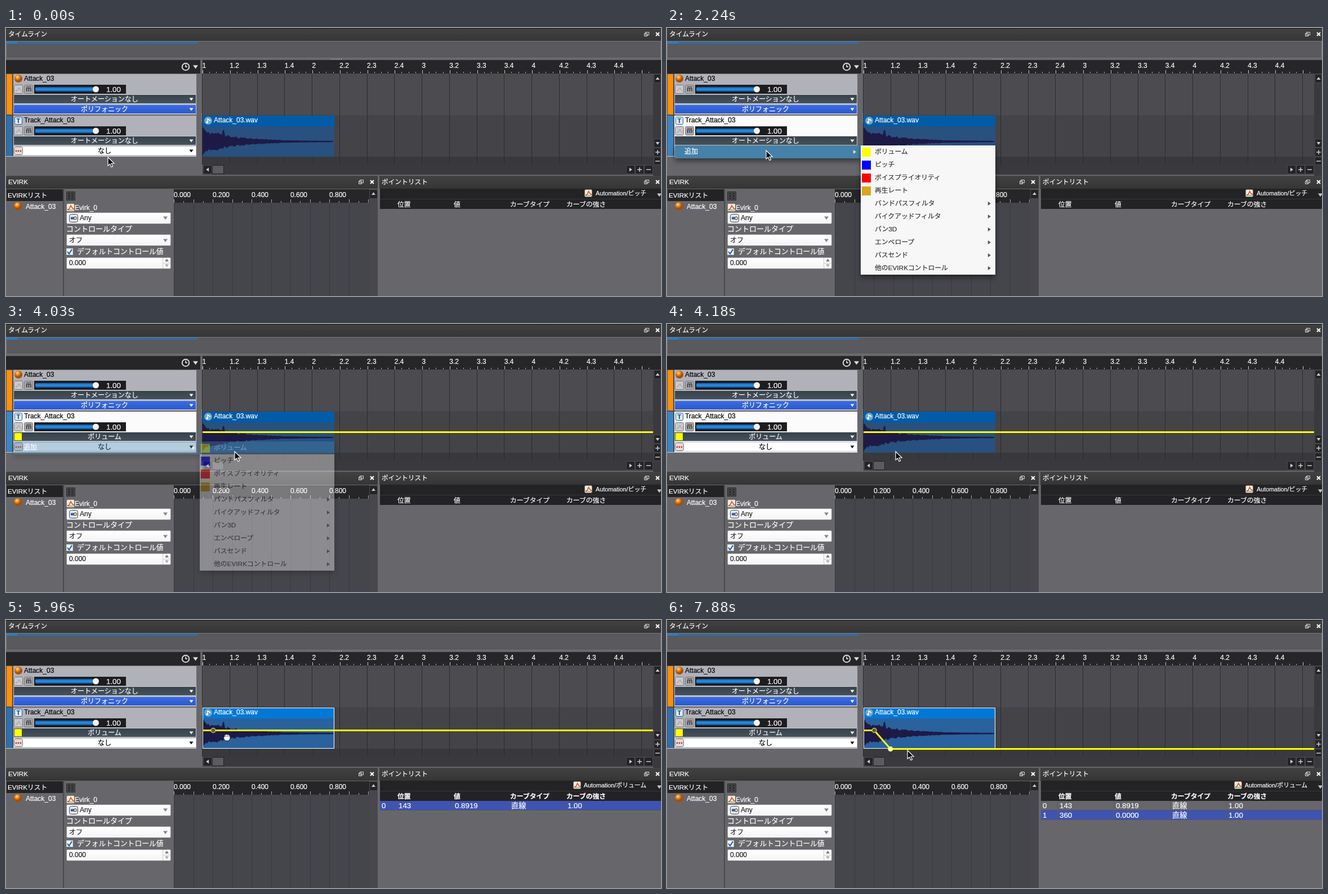
Animation of 1163x477 px, one loop 8000 ms. Source, as an HTML page:

```html
<!DOCTYPE html>
<html lang="ja">
<head>
<meta charset="utf-8">
<style>
html, body { margin: 0; width: 100%; height: 100%; overflow: hidden; background: #67676b; }
svg { display: block; width: 1163px; height: 477px; }
text { font-family: "Liberation Sans", "Noto Sans CJK JP", "Noto Sans CJK", sans-serif; white-space: pre; }
.menu { filter: drop-shadow(0 5px 5px #0007); }
</style>
</head>
<body>
<svg id="stage" viewBox="0 0 1163 477"></svg>
<script>
const LOOP = 8000, GREY = '#67676b', DARK = '#232326', YELLOW = '#ffff00';
const LEFT = 349, BEAT = 48.75;

const rect = (x, y, w, h, fill, extra = '') =>
  `<rect x="${x}" y="${y}" width="${w}" height="${h}" fill="${fill}" ${extra}/>`;
const frame = (x, y, w, h, fill, stroke, extra = '') =>
  rect(x + .5, y + .5, w - 1, h - 1, fill, `stroke="${stroke}" ${extra}`);
const path = (d, fill = 'none', stroke = 'none', width = 1) =>
  `<path d="${d}" fill="${fill}" stroke="${stroke}" stroke-width="${width}"/>`;
const circle = (x, y, r, fill, extra = '') => `<circle cx="${x}" cy="${y}" r="${r}" fill="${fill}" ${extra}/>`;
const text = (x, y, str, fill = '#fff', size = 12, extra = '') =>
  `<text x="${x}" y="${y}" fill="${fill}" stroke="${fill}" stroke-width=".2" font-size="${size}" ${extra}>${str}</text>`;
const centered = (x, y, str, fill) => text(x, y, str, fill, 12, 'text-anchor="middle"');
const repeat = (n, draw) => Array.from({ length: n }, (_, i) => draw(i)).join('');

const triangle = (x, y, dir, fill = '#fff', r = 3.5) => `<path d="M${-r} ${-r * .6}H${r}L0 ${r * .8}Z" fill="${fill}"
  transform="translate(${x} ${y}) rotate(${{ down: 0, left: 90, up: 180, right: -90 }[dir]})"/>`;
const gradient = (id, ...stops) => `<linearGradient id="${id}" x2="0" y2="1">${
  stops.map((c, i) => `<stop offset="${i / (stops.length - 1)}" stop-color="${c}"/>`).join('')}</linearGradient>`;

const defs = '<defs>' +
  gradient('title', '#424242', '#353535') + gradient('slate', '#35414b', '#46525c') +
  gradient('royal', '#3a6ee6', '#2b58cc') + gradient('slide', '#0d57a5', '#2a93e8', '#0d57a5') +
  gradient('plain', '#fff', '#f4f4f6') +
  `<radialGradient id="ball" cx=".38" cy=".3"><stop stop-color="#ffe2b0"/><stop offset=".4" stop-color="#f59426"/>
   <stop offset="1" stop-color="#a84c00"/></radialGradient></defs>`;

const ball = (x, y) => circle(x, y, 7, 'url(#ball)');
const curveIcon = (x, y, s = 14) => frame(x, y, s, s, '#f3ead2', '#777', 'rx="2"') +
  path(`M${x + 2} ${y + s * .75}l${s * .2} -1l${s * .2} -${s * .42}l${s * .18} ${s * .3}l${s * .22} 2`, 'none', '#d8352c', 1.4) +
  path(`M${x + 2} ${y + s - 3}h${s - 4}`, 'none', '#3c9a48');

// The window buttons end at x = r
const titleBar = (x, y, w, label, r = x + w) => rect(x, y, w, 23, 'url(#title)') +
  text(x + 4, y + 15, label, '#fff', 11.7) +
  path(`M${r - 27.5} ${y + 7.5}h6v5h-6zM${r - 29.5} ${y + 9.5}h5v5h-5z`, '#3a3a3a', '#ddd') +
  path(`M${r - 9} ${y + 8}l6 6m0 -6l-6 6`, 'none', '#fff', 2);

const dropdown = (y, label, fill, ink = '#fff') => frame(13, y, 325, 17, fill, '#c9c9cf') +
  centered(175, y + 13, label, ink) + triangle(329, y + 8.5, 'down', ink);

function trackHeader(y, name, bar, body) {
  return rect(0, y, 345, 74, GREY) + rect(0, y, 13, 74, '#4a4a4e') + rect(1, y + 1, 10, 72, bar) +
    rect(13, y + 1, 325, 72, body) + text(32, y + 13, name, '#000') +
    frame(14, y + 20, 16, 16, '#c9c9ce', '#777', 'rx="2"') +
    path(`M17 ${y + 31}l3 -1l3 -5l2 4l3 2`, 'none', '#999') +
    frame(32, y + 20, 16, 16, '#a9a9ae', '#777', 'rx="2"') + text(35, y + 32, 'm', '#444', 12, 'font-weight="bold"') +
    rect(36, y + 23, 9, 1, '#444') +
    rect(50, y + 20, 163, 16, '#1d1d20') + rect(52, y + 24, 110, 8, 'url(#slide)', 'rx="2"') +
    circle(159.5, y + 28, 5.5, '#f5f5f5') + text(178, y + 33, '1.00', '#fff', 13.3);
}

function headers(s) {
  const volume = s.automation;
  return rect(0, 57, 345, 24, '#262628') +
    circle(319, 69, 6.2, '#222', 'stroke="#ddd" stroke-width="2"') + path('M319 65v4h3', 'none', '#fff', 1.3) +
    triangle(336.5, 69, 'down', '#ddd', 4.5) +
    trackHeader(81, 'Attack_03', '#ff8f0c', '#b1b1ba') + ball(22, 90) +
    dropdown(118, 'オートメーションなし', 'url(#slate)') + dropdown(136, 'ポリフォニック', 'url(#royal)') +
    trackHeader(155, 'Track_Attack_03', s.active ? '#3c86c6' : '#2e70ae', s.active ? '#fbfbfc' : '#b1b1ba') +
    frame(15, 158, 14, 14, '#d9ecfa', '#245d8e', 'rx="2"') + text(18.5, 169, 'T', '#174a78', 11, 'font-weight="bold"') +
    dropdown(192, volume ? 'ボリューム' : 'オートメーションなし', 'url(#slate)') +
    (volume ? rect(15, 194, 13, 13, YELLOW) : '') +
    dropdown(210, 'なし', '#fff', '#000') + frame(14, 211, 16, 15, '#e4dcd8', '#777', 'rx="3"') +
    repeat(3, i => circle(18 + i * 4, 219, 1.4, '#c5332b')) +
    rect(0, 228, 338, 1, '#ccc') + rect(0, 229, 345, 34, GREY);
}

// Decaying noise burst, mirrored around the clip's centre line
function waveform() {
  const noise = x => Math.abs(Math.sin(x * 12.9898) * 43758.5453) % 1;
  const edge = side => Array.from({ length: 117 }, (_, i) => {
    const d = i * 2;
    const spike = side < 0 && Math.abs(d - 37) < 2 ? 8 : 0;
    const amp = 25 * Math.exp(-d / 56) * (.62 + .38 * noise(d + side)) + .8 + spike;
    return `${LEFT + d} ${(202 + side * amp).toFixed(1)}`;
  });
  return path('M' + [...edge(-1), ...edge(1).reverse()].join('L') + 'Z', '#1e1a46');
}
const wave = waveform();

function clip(selected) {
  return rect(LEFT, 156, 234, 73, selected ? '#29629d' : '#28517f') +
    rect(LEFT, 156, 234, 19, selected ? '#0078d8' : '#005ba8') + wave +
    circle(359, 165, 7, '#6fa6c8') + path('M358 168v-6l4 2v2', 'none', '#fff', 1.4) + circle(357, 168, 1.8, '#fff') +
    text(369, 168, 'Attack_03.wav') +
    (selected ? frame(LEFT, 156, 234, 73, 'none', '#fff') : '');
}

const button = (x, y, w, h) => frame(x, y, w, h, '#242427', '#4c4c50');
const sign = (x, y, plus) => path(`M${x - 4} ${y}h8` + (plus ? `M${x} ${y - 4}v8` : ''), 'none', '#ccc', 1.5);

function timeline(s) {
  return rect(345, 57, 804, 24, '#262628') + rect(345, 57, 4, 206, GREY) +
    repeat(6, i => rect(347, 152 + i * 3, 2, 1, '#ccc')) +
    rect(LEFT, 81, 800, 74, '#4b4b50') + rect(LEFT, 155, 800, 74, '#434348') + rect(LEFT, 229, 800, 14, '#39393d') +
    repeat(17, i => rect(Math.round(LEFT + i * BEAT) - 1, 81, 1, 162, '#2c2c30')) +
    repeat(66, i => rect(Math.round(LEFT + i * BEAT / 4), i % 4 ? 78 : 75, 1, i % 4 ? 2 : 6, '#ccc')) +
    repeat(16, i => text(LEFT + i * BEAT - .5, 71, (i >> 2) + 1 + (i % 4 ? '.' + (i % 4 + 1) : ''))) +
    clip(s.selected) +
    rect(LEFT, 243, 800, 18, '#3a3a3e') + button(350, 244, 16, 16) + triangle(358, 252, 'left', '#ccc') +
    frame(366, 244, 21, 16, '#5b5b60', '#222') + button(1101, 244, 16, 16) + triangle(1109, 252, 'right', '#ccc') +
    button(1117, 244, 16, 16) + sign(1125, 252, true) + button(1133, 244, 16, 16) + sign(1141, 252) +
    rect(1149, 57, 14, 206, '#3a3a3e') + rect(1149, 57, 14, 24, '#262628') +
    button(1150, 82, 13, 16) + triangle(1157, 90, 'up', '#ccc') + button(1150, 197, 13, 16) + triangle(1157, 205, 'down', '#ccc') +
    button(1150, 213, 13, 16) + sign(1157, 221, true) + button(1150, 229, 13, 15) + sign(1157, 237);
}

const pointX = position => LEFT + position * .1327;
const pointY = value => Math.round(229 - value * 37.5) + .5;

function automation(s) {
  if (!s.automation) return '';
  const pts = s.points.map(([pos, val]) => [pointX(pos), pointY(val)]);
  const startY = pts.length ? pts[0][1] : pointY(1);
  const endY = pts.length ? pts[pts.length - 1][1] : startY;
  const line = `M${LEFT} ${startY}` + pts.map(p => `L${p}`).join('') + `L1149 ${endY}`;
  const guide = s.drag ? rect(Math.round(pts[pts.length - 1][0]), 157, 1, 71, '#c8d4e2') : '';
  const dots = pts.map(([x, y], i) => i
    ? (s.drag ? '' : circle(x, y, 4, '#fff', `stroke="${YELLOW}" stroke-width="1.3"`))
    : circle(x, y, 4, '#55585c', 'stroke="#c8c81e" stroke-width="1.5"'));
  return guide + path(line, 'none', YELLOW, 3) + dots.join('');
}

function controlPanel() {
  const combo = y => frame(107, y, 186, 21, 'url(#plain)', '#88888c', 'rx="2"');
  return titleBar(0, 263, 660, 'EVIRK', 656) + rect(0, 286, 660, 191, GREY) +
    rect(1, 287, 100, 21, DARK) + text(3, 302, 'EVIRKリスト', '#fff', 11.7) + rect(101, 287, 2, 190, '#4a4a4e') +
    ball(21, 317) + text(35, 322, 'Attack_03') +
    frame(107, 291, 16, 16, '#46464a', '#2a2a2c') +
    repeat(4, i => path(`M110 ${294.5 + i * 3}h4m2 0h4`, 'none', '#111')) +
    curveIcon(107, 312, 15) + text(122, 324, 'Evirk_0') +
    combo(328) + frame(112, 331, 16, 15, '#dfe8f4', '#444', 'rx="3"') + path('M115 338.5h9', 'none', '#3256a4', 4) +
    circle(123, 338.5, 2.5, '#ffe28a', 'stroke="#333"') +
    text(131, 342, 'Any', '#222') + triangle(283, 338, 'down', '#888', 4) +
    text(107, 362, 'コントロールタイプ', '#fff', 13) +
    combo(367) + text(112, 382, 'オフ', '#222') + triangle(283, 378, 'down', '#888', 4) +
    frame(107, 392, 12, 12, '#eef4fb', '#ccc') + path('M109 398l3 4l5 -8', 'none', '#1f5ea8', 2) +
    text(126, 402, 'デフォルトコントロール値', '#fff', 12.8) +
    combo(408) + text(112, 422, '0.000', '#222') + rect(278, 409, 1, 19, '#ccc') +
    triangle(285.5, 413.5, 'up', '#777') + triangle(285.5, 422.5, 'down', '#aaa') + rect(279, 418, 13, 1, '#ccc') +
    rect(298, 287, 347, 24, '#262628') + rect(298, 311, 347, 166, '#45454c') +
    repeat(10, i => rect(Math.round(298 + i * 34.5), 311, 1, 166, '#38383d')) +
    repeat(21, i => rect(Math.round(298 + i * 17.25), i % 2 ? 308 : 305, 1, i % 2 ? 3 : 6, '#aaa')) +
    repeat(5, i => text(298 + i * 69, 301, (i * .2).toFixed(3))) +
    rect(645, 287, 15, 190, '#48484c') + button(645, 287, 15, 17) + triangle(652.5, 295, 'up', '#ccc') +
    rect(660, 263, 3, 214, GREY);
}

function pointList(s) {
  const columns = ['位置', '値', 'カーブタイプ', 'カーブの強さ'];
  const label = 'Automation/' + (s.selected ? 'ボリューム' : 'ピッチ');
  const weight = s.selected ? 'font-weight="bold"' : '';
  return titleBar(663, 263, 500, 'ポイントリスト') + rect(663, 286, 500, 191, GREY) +
    rect(664, 286, 499, 36, DARK) + rect(664, 304, 499, 1, '#38383b') +
    curveIcon(s.selected ? 1007 : 1027, 287) + text(1137, 298, label, '#fff', 10.8, 'text-anchor="end"') +
    triangle(1160, 297, 'down', '#ccc', 4) +
    columns.map((c, i) => text(695 + i * 100, 318, c, '#fff', 11.8, weight)).join('') +
    s.points.map(([pos, val], i) => {
      const y = 322 + i * 17, last = i === s.points.length - 1;
      const cells = [pos, val.toFixed(4), '直線', '1.00'];
      return rect(664, y, 499, 17, last ? '#3f53b3' : GREY) + rect(664, y + 16, 499, 1, '#55555a') +
        repeat(4, c => rect(693 + c * 100, y, 1, 17, '#5a5a66')) + text(667, y + 13, i, '#fff', 13.3) +
        cells.map((c, k) => text(697 + k * 100, y + 13, c, '#fff', 13.3)).join('');
    }).join('');
}

const MENU = ['ボリューム', 'ピッチ', 'ボイスプライオリティ', '再生レート', 'バンドパスフィルタ', 'バイクアッドフィルタ',
  'パン3D', 'エンベロープ', 'バスセンド', '他のEVIRKコントロール'];
const SWATCHES = ['#ffff00', '#0000ff', '#ff0000', '#daa520'];
const HOVER = '#4581a8';

function menus(s) {
  if (!s.menu) return '';
  const open = s.menu > 1;
  const root = rect(14, 209, 330, 23, open ? HOVER : '#f7f7f7') + text(31, 224, '追加', open ? '#fff' : '#333') +
    triangle(333, 220.5, 'right', open ? '#ddd' : '#555');
  const items = MENU.map((label, i) => {
    const y = 209 + i * 23, hot = s.hover && i === 0;
    return (hot ? rect(344, y, 239, 23, HOVER) : '') +
      (i < SWATCHES.length ? rect(346, y + 4, 16, 16, SWATCHES[i]) : triangle(572, y + 11.5, 'right', '#555')) +
      text(369, y + 15, label, hot ? '#fff' : '#333', 11.8);
  }).join('');
  const sub = s.menu > 2 ? `<g class="menu">${rect(344, 209, 239, 230, '#f7f7f7')}${items}</g>` : '';
  return `<g opacity="${s.fade}"><g class="menu">${root}</g>${sub}</g>`;
}

function cursor([kind, x, y]) {
  const shape = kind === 'arrow'
    ? path('M0 0V15L3.5 12L6 17.5L8.5 16.4L6 11H11Z', '#000', '#fff', 1.2)
    : path('M-3 6L-6 1Q-6 -2 -4 -1V-4Q-3 -6 -1.5 -5Q0 -7 1.5 -5Q3.5 -6 4 -4Q6 -4 6 -2V2L4 6Z', '#fff', '#111') +
      path('M-1.5 -4v3M1.5 -4v3M4 -3v2', 'none', '#222', .8);
  return `<g transform="translate(${x} ${y})">${shape}</g>`;
}

const chrome = defs + rect(0, 0, 1163, 477, GREY) + titleBar(0, 0, 1163, 'タイムライン') + rect(0, 0, 1163, 1, '#111') +
  frame(0, 23, 1163, 31, '#59595e', '#77777b') + rect(1, 24, 340, 4, '#3a6a9b') + rect(1, 24, 19, 4, '#2b7cc4') +
  repeat(7, i => rect(577 + i * 3, 55, 1, 1, '#ccc'));
const panel = controlPanel();

const scene = s => chrome + headers(s) + timeline(s) + panel + pointList(s) + automation(s) + menus(s) + cursor(s.cursor);

// Each step changes only what differs from the one before it
const first = [143, .8919];
const steps = [
  [0, { cursor: ['arrow', 181, 230], points: [], fade: 1 }],
  [150, { cursor: ['arrow', 176, 212] }],
  [300, { cursor: ['arrow', 174, 202] }],
  [1340, { active: true, menu: 1 }],
  [1940, { cursor: ['arrow', 175, 210], menu: 2 }],
  [2090, { cursor: ['arrow', 176, 217] }],
  [2240, { cursor: ['arrow', 176, 218], menu: 3 }],
  [2990, { cursor: ['arrow', 245, 220] }],
  [3140, { cursor: ['arrow', 372, 224], hover: true }],
  [3280, { cursor: ['arrow', 406, 227] }],
  [4030, { automation: true, fade: .4 }],
  [4180, { menu: 0 }],
  [4480, { cursor: ['hand', 384, 215] }],
  [4630, { cursor: ['hand', 368, 203] }],
  [5220, { active: false, selected: true, drag: true, points: [[143, .973]] }],
  [5370, { points: [first] }],
  [5520, { drag: false }],
  [5670, { cursor: ['hand', 371, 204] }],
  [5810, { cursor: ['hand', 382, 206] }],
  [5960, { cursor: ['hand', 392, 209] }],
  [6110, { cursor: ['hand', 391, 216] }],
  [6410, { cursor: ['hand', 394, 211] }],
  [6550, { cursor: ['hand', 396, 206] }],
  [6850, { cursor: ['hand', 396, 203], drag: true, points: [first, [353, .8378]] }],
  [6990, { cursor: ['hand', 396, 199] }],
  [7290, { cursor: ['hand', 396, 209], points: [first, [353, .5676]] }],
  [7440, { cursor: ['hand', 397, 224], points: [first, [360, .1622]] }],
  [7590, { cursor: ['hand', 397, 232], points: [first, [360, 0]] }],
  [7740, { cursor: ['arrow', 408, 232], drag: false }],
  [7880, { cursor: ['arrow', 427, 232] }]
];
let state = {};
const states = steps.map(([, change]) => state = { ...state, ...change });

const stage = document.getElementById('stage');
const start = performance.now();
let shown = -1;
function tick() {
  const time = (performance.now() - start) % LOOP;
  const index = steps.findLastIndex(([at]) => at <= time);
  if (index !== shown) stage.innerHTML = scene(states[shown = index]);
  requestAnimationFrame(tick);
}
tick();
</script>
</body>
</html>
```
